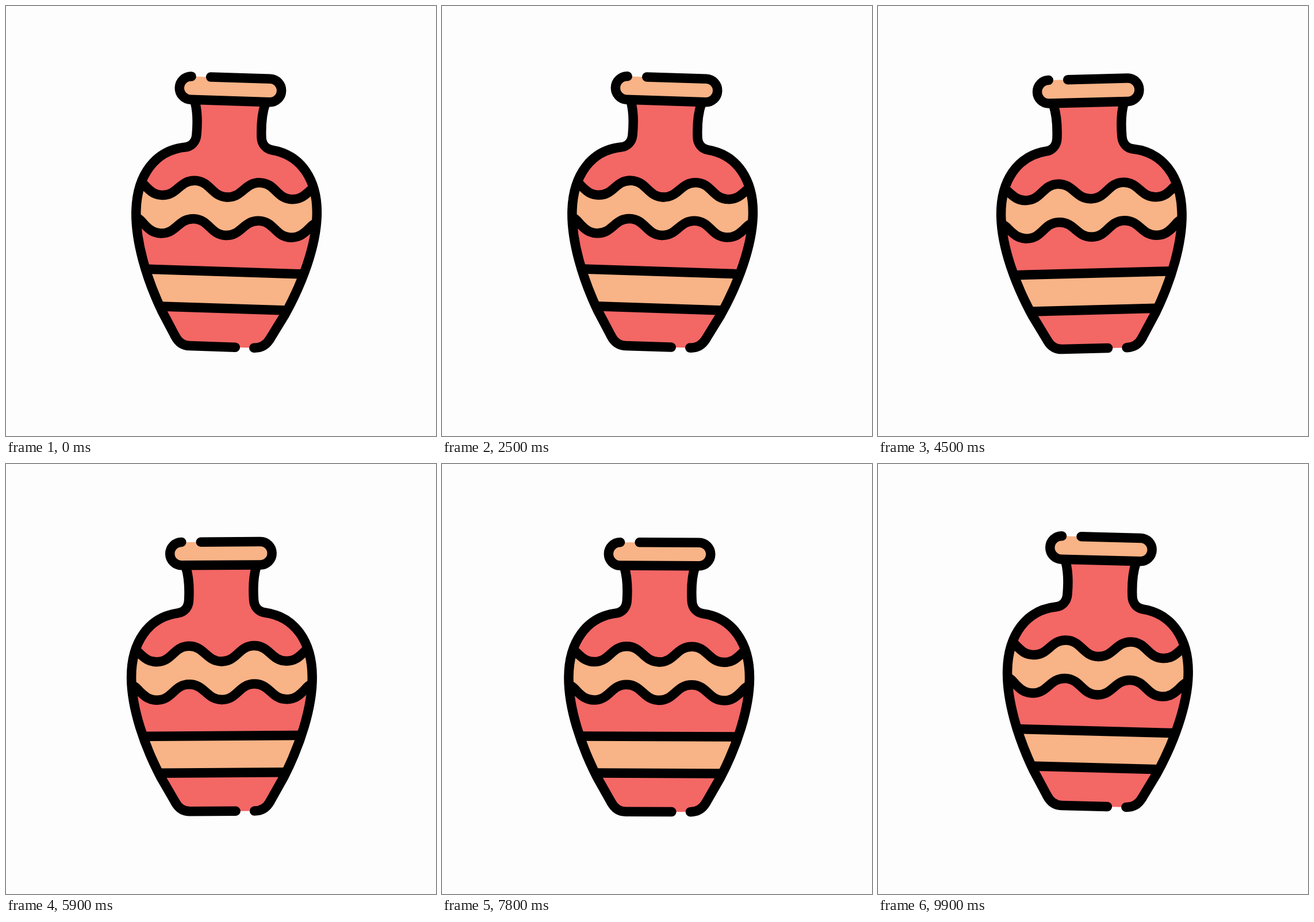
Write an HTML page that moves like this. It is 748 by 748 pixels and loops after 10 s.

```html
<!DOCTYPE html>
<html lang="en">
<head>
<meta charset="utf-8">
<title>Rocking vase</title>
<style>
  html, body { margin: 0; width: 100%; height: 100%; overflow: hidden; background: #fdfdfd; }
  svg { display: block; width: 100%; height: 100%; }
  .red { fill: #f36765; }
  .sand { fill: #f8b386; }
  .line { fill: none; stroke: #000; stroke-width: 16.5; stroke-linecap: round; stroke-linejoin: round; }
</style>
</head>
<body>
<svg id="stage" viewBox="0 0 748 748"></svg>
<script>
const LOOP = 10000, STEP = 100;
const TILT = 1.86, HOP = 14, REST = 1.8;
const SPEED = 5, PHASE = 0.14;
const PIVOT = "376.8 583";

// The vase is symmetric: these outlines describe its left half.
const side = "M315.5 180C320.5 196 321.8 214 320.3 238C319.6 250 312 258.5 301 260" +
  "C250 267 219.5 310 219.5 372C219.5 425 241 490 270 546L294.5 589";
const foot = "C301 601 310 605 320 605";
const wave = (start, y) =>
  `M${start} 250 ${y} 263.7 ${y}C291 ${y} 293 ${y - 27} 320.2 ${y - 27}` +
  `C347 ${y - 27} 350 ${y} 376.8 ${y}`;
const upper = wave("228 323.7L235.5 331C242.7 337.75", 344.5);
const lower = wave("220.5 385C227 387 229 391 235.5 397.5C242.7 404.25", 411);
const rim = "M308.2 136.5A20.2 20.2 0 0 0 308.2 176.9H445.3A20.2 20.2 0 0 0 445.3 136.5H341.7";

const shape = (kind, d) => `<path class="${kind}" d="${d}"/>`;
const both = part => part + `<g transform="translate(753.6) scale(-1 1)">${part}</g>`;

document.getElementById("stage").innerHTML = `<g id="vase">` +
  both(shape("red", side + foot + "H378V180Z")) +
  both(shape("sand", upper + "H378V420H225Z")) +
  both(shape("red", lower + "H378V474H237Z")) +
  shape("sand", "M239 474H514.6L488 538H265.6Z") +
  shape("sand", rim + "Z") +
  both(shape("line", upper) + shape("line", lower) + shape("line", side)) +
  shape("line", "M242 474H511.6M268 538H485.6") +
  shape("line", "M294.5 589" + foot + "H399.5") +
  shape("line", "M459.1 589C453 600 443 605 432 605") +
  shape("line", rim) + `</g>`;

const vase = document.getElementById("vase");

function draw(ms) {
  const t = Math.floor((ms % LOOP) / STEP) * STEP / 1000;
  const swing = Math.cos(SPEED * t + PHASE);
  const y = REST - HOP * Math.abs(swing);
  vase.setAttribute("transform", `translate(0 ${y}) rotate(${TILT * swing} ${PIVOT})`);
}

const begin = performance.now();
function tick() {
  draw(performance.now() - begin);
  requestAnimationFrame(tick);
}
tick();
</script>
</body>
</html>
```
